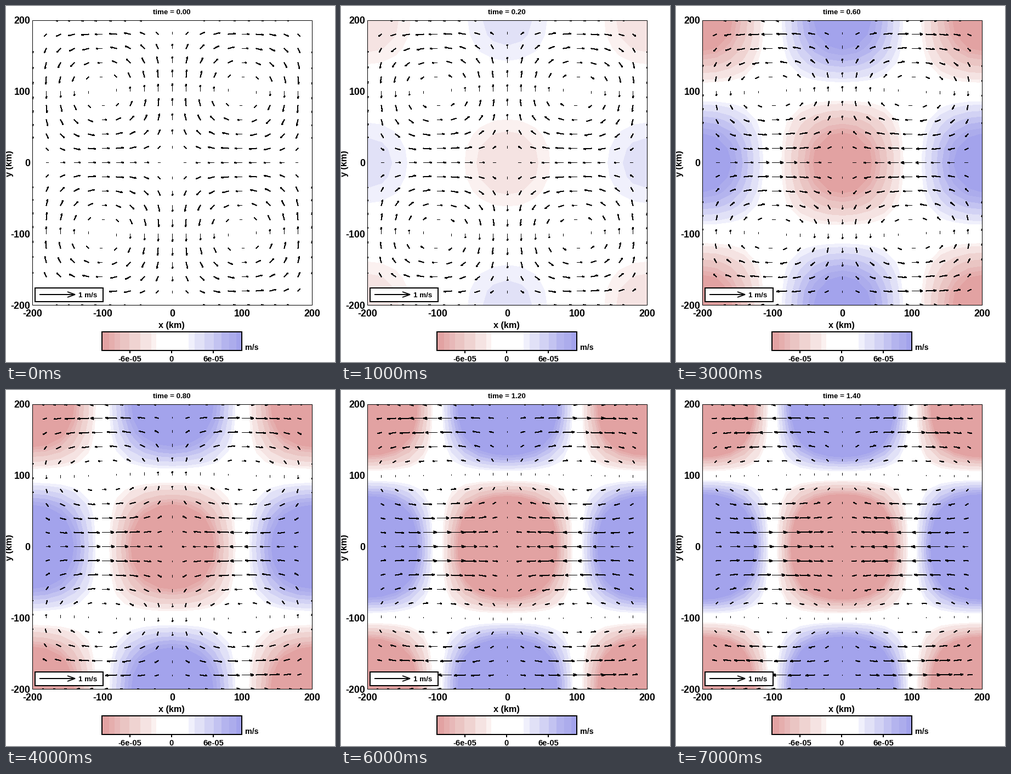
Animation of 600 by 649 pixels, one loop 8000 ms. Source, as a matplotlib script:

```python
import numpy as np
import matplotlib.pyplot as plt
from matplotlib.animation import FuncAnimation
from matplotlib.collections import LineCollection
from matplotlib.patches import Rectangle

W, H, DPI = 600, 649, 100
PX = 72 / DPI  # points per pixel
LEFT, RIGHT, TOP, BOTTOM = 48.5, 558.5, 26.5, 545.5

# Shading levels in 1e-5 m/s, with a white band around zero
LEVELS = [-9.0, -8.2, -7.4, -6.05, -4.5, -2.95, -2.2,
          2.45, 3.3, 4.75, 6.05, 7.2, 8.3, 9.3]
REDS = ["#e2a2a2", "#e5aead", "#e7b8b8", "#eac5c3", "#efd3d1", "#f5e3e2", "#fbf1f0"]
BLUES = ["#f0f0fc", "#e1e1f7", "#d2d2f4", "#c3c3f1", "#b4b4ee", "#acacec", "#a3a3ec"]
COLORS = REDS + ["#ffffff"] + BLUES

# Amplitudes at each time step of 0.2
LIFT = [0, 3.9, 7.6, 11.6, 15.4, 19.0, 21.5, 23.5]
ZONAL = [0.22, 0.25, 0.28, 0.31, 0.345, 0.38, 0.41, 0.44]
MERID = [0.22, 0.195, 0.165, 0.135, 0.105, 0.08, 0.065, 0.055]
UNIT = 64  # pixels for 1 m/s
HEAD, SPREAD = 0.22, 0.08  # arrowhead length and half width per arrow length

plt.rcParams["font.family"] = "Liberation Sans"
plt.rcParams["font.weight"] = "bold"

fig = plt.figure(figsize=(W / DPI, H / DPI), dpi=DPI, facecolor="white")
ax = fig.add_axes([0, 0, 1, 1])
ax.set_xlim(0, W)
ax.set_ylim(H, 0)
ax.axis("off")


def px_x(x):
    return LEFT + (x + 200) * (RIGHT - LEFT) / 400


def px_y(y):
    return TOP + (200 - y) * (BOTTOM - TOP) / 400


def label(x, y, s, size, ha="center", **kw):
    kw.setdefault("va", "baseline")
    return ax.text(x, y, s, fontsize=size * PX, ha=ha, zorder=8, **kw)


def box(x0, y0, x1, y1, lw, fill="none", z=5):
    return ax.add_patch(Rectangle((x0, y0), x1 - x0, y1 - y0, fc=fill, ec="black",
                                  lw=lw * PX, zorder=z, joinstyle="miter", snap=False))


def line(xs, ys, lw):
    ax.plot(xs, ys, color="black", lw=lw * PX, zorder=7, snap=False,
            solid_capstyle="butt", solid_joinstyle="miter")


# Plot frame and axis labels
frame = box(LEFT, TOP, RIGHT, BOTTOM, 1)
for v in range(-200, 201, 100):
    label(44.5, px_y(v) + 6, str(v), 17.8, "right")
    label(px_x(v), 566, str(v), 17.8)
label(302, 587, "x (km)", 16.3)
label(7, 287, "y (km)", 16.3, rotation=90, va="center")
title = label(302.5, 15, "", 13.4)

# Reference arrow
box(53, 514, 177, 539, 2, "white", 6)
line([61, 126], [526, 526], 2)
line([112, 126, 112], [521, 526, 531], 1.8)
label(132, 531, "1 m/s", 13.4, "left")

# Colour bar
BAR0, BAR1, ZERO, PER = 175, 430, 302, 12.68
edges = np.round([BAR0] + [ZERO + PER * v for v in LEVELS] + [BAR1])
for a, b, c in zip(edges[:-1], edges[1:], COLORS):
    ax.add_patch(Rectangle((a, 594), b - a, 34, fc=c, ec="none", lw=0,
                           antialiased=False, zorder=4))
box(BAR0, 594, BAR1, 628, 2)
for v, s in ((-6, "-6e-05"), (0, "0"), (6, "6e-05")):
    x = round(ZERO + PER * v)
    line([x, x], [628, 633], 2)
    label(x, 647.5, s, 14.8)
label(436, 627, "m/s", 14.2, "left")

# Grid every 20 km
grid = np.arange(-200, 201, 20)
gx, gy = np.meshgrid(grid, grid)
kx, ky = np.pi * gx / 200, np.pi * gy / 200
tails = np.stack([np.floor(px_x(gx) - 0.5), np.floor(px_y(gy) - 0.5)], -1).reshape(-1, 2)


def arrow_paths(u, v):
    """Strokes of tail, tip and two barbs, all on pixel centres."""
    vec = UNIT * np.stack([u, -v], -1).reshape(-1, 2)
    side = vec[:, ::-1] * [-1, 1]
    tip = tails + vec
    back = tip - HEAD * vec
    points = [tails, tip, back + SPREAD * side, tip, back - SPREAD * side]
    return np.round(np.stack(points, 1)) + 0.5


arrows = LineCollection([], colors="black", linewidths=PX, antialiaseds=False,
                        capstyle="projecting", zorder=3)
arrows.set_snap(False)
ax.add_collection(arrows, autolim=False)
arrows.set_clip_path(frame)

shade = None


def draw(i):
    global shade
    if shade is not None:
        shade.remove()
    lift = -LIFT[i] * np.cos(kx) * np.cos(ky)
    shade = ax.contourf(px_x(gx), px_y(gy), lift, levels=LEVELS, colors=COLORS,
                        extend="both", zorder=1)
    u = -ZONAL[i] * np.sin(kx) * np.cos(ky)
    v = MERID[i] * np.cos(kx) * np.sin(ky)
    arrows.set_segments(arrow_paths(u, v))
    title.set_text(f"time = {0.2 * i:.2f}")
    return arrows, title


anim = FuncAnimation(fig, draw, frames=8, interval=1000, init_func=lambda: draw(0),
                     repeat=True, repeat_delay=0, blit=False)
plt.show()
```
